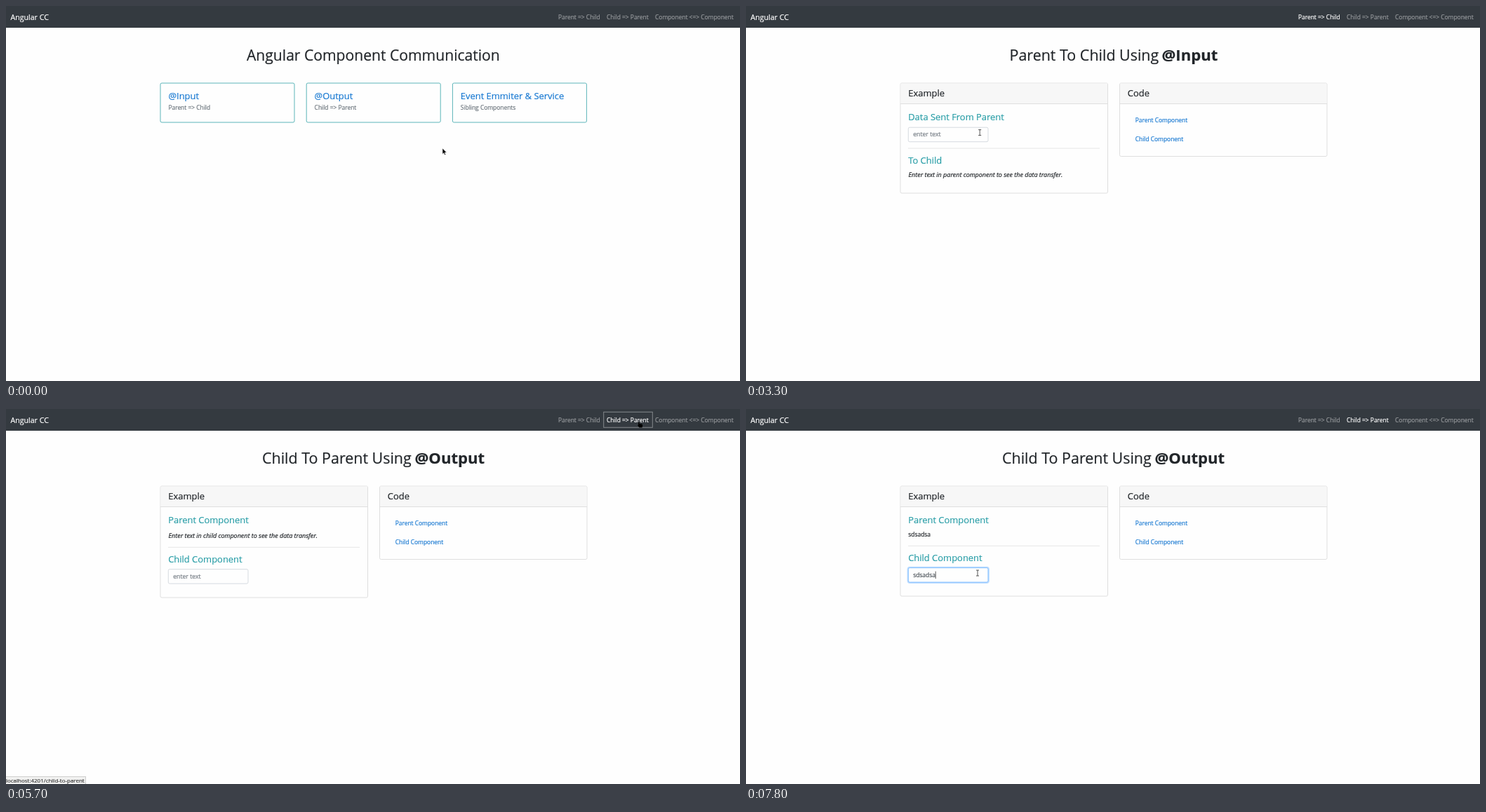
These frames come from a looping animation (1046 by 535 pixels, 8000 ms). An HTML page:

```html
<!DOCTYPE html>
<html lang="en">
<head>
<meta charset="utf-8">
<title>Angular CC</title>
<style>
html, body { margin: 0; width: 100%; height: 100%; overflow: hidden; background: #fefefe; }
svg { display: block; width: 1046px; height: 535px; font-family: "Open Sans", "Noto Sans", sans-serif; }
text { stroke-width: .2px; }
</style>
</head>
<body>
<svg id="stage" viewBox="0 0 1046 535"></svg>
<script>
const stage = document.getElementById('stage');
const LOOP = 8000, BODY = 8.42, TITLE = 12.95, HEAD = 21.1;
const INK = '#212529', LINK = '#1a7ad2', DARK = '#0d4f98', TEAL = '#2c9fa8';

const esc = s => s.replace(/&/g, '&amp;').replace(/</g, '&lt;');
const text = (x, y, size, fill, s, extra = '') =>
  `<text x="${x}" y="${y}" font-size="${size}" fill="${fill}" stroke="${fill}" ${extra}>${esc(s)}</text>`;
const box = (x, y, w, h, fill, stroke, extra = '') =>
  `<rect x="${x}" y="${y}" width="${w}" height="${h}" fill="${fill}" stroke="${stroke}" ${extra}/>`;
const rule = (x, y, w, color) => `<path d="M${x} ${y}h${w}" stroke="${color}"/>`;

const routes = ['parent-to-child', 'child-to-parent', 'siblings'];
const navItems = [[787, 'Parent => Child'], [856, 'Child => Parent'], [925, 'Component <=> Component']];
const cards = [
  ['@Input', 'Parent => Child'],
  ['@Output', 'Child => Parent'],
  ['Event Emmiter & Service', 'Sibling Components']
];

const pointers = {
  arrow: '<path d="M0 0V8.4L1.9 6.6 3.2 9.6 4.6 9 3.3 6.1H5.9Z" stroke="#fff" stroke-width=".5"/>',
  hand: '<path d="M1 .3C2-.2 2.6.5 2.7 3L6 3.6Q7.3 4 7.2 5.5L6.6 8.5H2.4L.3 5.4Q0 4.5 1.2 4.6Z"/>',
  beam: '<path d="M-2 .5h4M0 .5v8M-2 8.5h4" fill="none" stroke="#444" stroke-width=".9"/>'
};

// Each step overrides part of the state and holds until the next one.
const steps = [
  [0, { page: 'home', at: ['arrow', 622, 203], hover: -1, status: -1, outline: '', typed: '', focus: false, caret: false }],
  [500, { at: ['arrow', 362, 173] }],
  [800, { at: ['hand', 360, 156], hover: 0 }],
  [1000, { at: ['hand', 362, 152], status: 0 }],
  [1100, { at: ['hand', 365, 150] }],
  [1300, { at: ['hand', 470, 150], hover: 1 }],
  [1400, { at: ['hand', 544, 151], status: 1 }],
  [1700, { at: ['hand', 642, 152], hover: 2, status: 2 }],
  [1800, { at: ['hand', 650, 152] }],
  [2100, { at: ['hand', 596, 152], hover: 1, status: 1 }],
  [2200, { at: ['hand', 474, 152] }],
  [2300, { at: ['hand', 392, 152], hover: 0, status: 0 }],
  [2500, { at: ['hand', 382, 148.5] }],
  [2700, { outline: 'brand' }],
  [2800, { page: 'input', outline: '', hover: -1 }],
  [2900, { status: -1 }],
  [3000, { at: ['arrow', 383, 148] }],
  [3200, { at: ['arrow', 356, 163] }],
  [3300, { at: ['beam', 333.2, 176] }],
  [3400, { at: ['beam', 331.5, 178] }],
  [3500, { at: ['beam', 330.5, 179] }],
  [3600, { focus: true }],
  [3700, { caret: true }],
  [4000, { typed: 'd' }],
  [4100, { typed: 'dsa' }],
  [4200, { typed: 'dsad' }],
  [4400, { typed: 'dsadsa' }],
  [4600, { at: ['beam', 340.5, 186], caret: false }],
  [4700, { at: ['arrow', 545, 102] }],
  [4800, { at: ['arrow', 738, 31] }],
  [5000, { at: ['arrow', 791, 34] }],
  [5100, { at: ['arrow', 868, 31] }],
  [5200, { at: ['hand', 935, 18], hover: 2, status: 2 }],
  [5400, { at: ['hand', 905, 18], hover: 1, status: 1 }],
  [5500, { at: ['hand', 900, 18] }],
  [5600, { outline: 'nav' }],
  [5700, { page: 'output', typed: '', focus: false }],
  [5900, { at: ['hand', 896, 20] }],
  [6000, { at: ['arrow', 889, 36], hover: -1, status: -1 }],
  [6100, { at: ['arrow', 886, 55] }],
  [6200, { at: ['arrow', 850, 82] }],
  [6300, { at: ['arrow', 790, 118] }],
  [6500, { at: ['arrow', 570, 188] }],
  [6600, { at: ['arrow', 410, 222] }],
  [6700, { at: ['beam', 338.5, 231] }],
  [6800, { at: ['beam', 329.5, 230], focus: true, outline: '' }],
  [6900, { caret: true }],
  [7100, { typed: 'sd' }],
  [7300, { typed: 'sds' }],
  [7400, { typed: 'sdsa' }],
  [7500, { typed: 'sdsad' }],
  [7600, { typed: 'sdsads' }],
  [7700, { typed: 'sdsadsa' }],
  [7800, { at: ['beam', 330, 229.5] }]
];

function navbar(s) {
  const active = ['input', 'output'].indexOf(s.page);
  const inNav = s.page !== 'home';
  let out = box(0, 0, 1046, 31, '#343a40', 'none') + text(6.5, 19.6, 10.6, '#fff', 'Angular CC');
  navItems.forEach(([x, label], i) => {
    const color = i === active ? '#fff' : inNav && i === s.hover ? '#ccced0' : '#96999c';
    out += text(x, 18.6, BODY, color, label);
  });
  if (s.outline === 'brand') out += box(6.5, 4.5, 54.5, 22, 'none', '#85898d');
  if (s.outline === 'nav') out += box(851.7, 4.3, 69.6, 22, 'none', '#85898d');
  return out;
}

function home(s) {
  let out = text(343, 78, HEAD, INK, 'Angular Component Communication');
  cards.forEach(([title, sub], i) => {
    const x = 220 + i * 208.2;
    out += box(x, 110, 191, 56, '#fefefe', '#5cb5b9', 'rx="2"') +
      text(x + 11.4, 133.3, TITLE, i === s.hover ? DARK : LINK, title) +
      text(x + 11.4, 148.4, BODY, '#6c757d', sub);
  });
  return out;
}

function panel(x, bottom, title) {
  return box(x, 110, 295.5, bottom - 110, '#fefefe', '#dfdfdf', 'rx="2"') +
    box(x + .5, 110.5, 294.5, 28.5, '#f7f7f7', 'none') +
    rule(x, 139.5, 295.5, '#dfdfdf') + text(x + 11.3, 129.3, TITLE, INK, title);
}

function field(y, s) {
  const ring = s.focus ? box(230.6, y - .9, 115.3, 22.3, 'none', '#bfdeff', 'rx="3" stroke-width="2"') : '';
  const caret = s.caret ? `<path id="caret" d="M238.5 ${y + 5}v10.5" stroke="#333" stroke-width=".8"/>` : '';
  const [size, color, value] = s.typed ? [BODY, '#495057', s.typed] : [8.7, '#747c84', 'enter text'];
  return ring + box(231.3, y, 113.7, 20.5, '#fefefe', s.focus ? '#80bdff' : '#d6dbe0', 'rx="2"') +
    text(238.2, y + 13.2, size, color, value, 'id="value"') + caret;
}

const message = (y, s, from) => s.typed
  ? text(231.3, y, BODY, INK, s.typed)
  : text(231.5, y, 9, INK, `Enter text in ${from} component to see the data transfer.`, 'font-style="italic"');

function example(s) {
  const input = s.page === 'input';
  const shift = input || s.typed ? 0 : 2;
  const [x, lead, boldX, bold] = input
    ? [375.5, 'Parent To Child Using', 592.5, '@Input']
    : [365, 'Child To Parent Using', 582.5, '@Output'];
  let out = text(x, 78, 21.45, INK, lead) + text(boldX, 78, 22.1, INK, bold, 'font-weight="700"') +
    panel(220, 267 + shift, 'Example') + panel(532.5, 214.5, 'Code') +
    text(554.7, 166.4, BODY, LINK, 'Parent Component') + text(554.7, 192.6, BODY, LINK, 'Child Component');
  if (input) {
    out += text(231.2, 163, TITLE, TEAL, 'Data Sent From Parent') + field(173.2, s) +
      rule(231, 203, 273, '#e6e6e6') + text(231.2, 224.5, TITLE, TEAL, 'To Child') + message(243.6, s, 'parent');
  } else {
    out += text(231.2, 163, TITLE, TEAL, 'Parent Component') + message(182.4 + shift, s, 'child') +
      rule(231, 195.3 + shift, 273, '#e6e6e6') +
      text(231.2, 216.8 + shift, TITLE, TEAL, 'Child Component') + field(226.6 + shift, s);
  }
  return out;
}

function statusBar(i) {
  if (i < 0) return '';
  return box(-1, 524.5, [114.5, 114.5, 88.5][i], 12, '#f1f1f0', '#cfcfce') +
    text(0, 533.2, 7.98, '#3c3c3c', 'localhost:4201/' + routes[i]);
}

function render(s) {
  const [kind, x, y] = s.at;
  stage.innerHTML = navbar(s) + (s.page === 'home' ? home(s) : example(s)) + statusBar(s.status) +
    `<g transform="translate(${x} ${y})">${pointers[kind]}</g>`;
  const caret = document.getElementById('caret');
  if (caret && s.typed) {
    const width = document.getElementById('value').getComputedTextLength();
    caret.setAttribute('transform', `translate(${width} 0)`);
  }
}

const states = [];
steps.reduce((state, [, change]) => {
  const next = { ...state, ...change };
  states.push(next);
  return next;
}, {});

const start = performance.now();
let shown = -1;
function tick() {
  const t = (performance.now() - start) % LOOP;
  const i = steps.filter(([from]) => from <= t).length - 1;
  if (i !== shown) render(states[shown = i]);
  requestAnimationFrame(tick);
}
tick();
</script>
</body>
</html>
```
